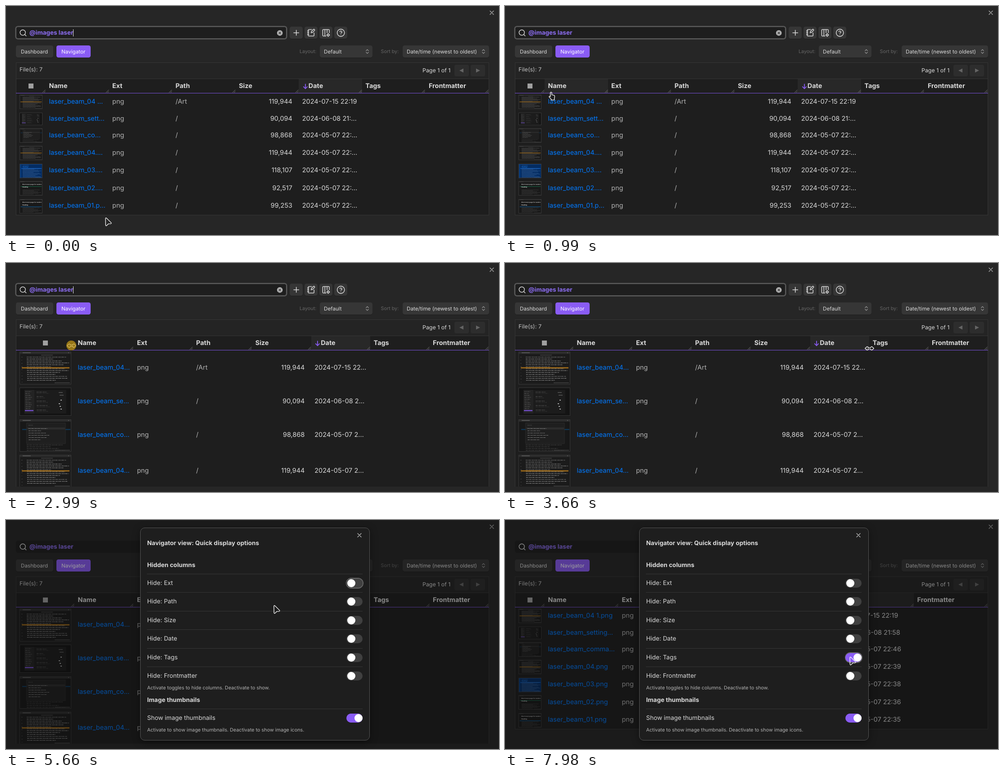
An HTML page that plays this animation: 1095x511 px, repeating every 8 s.

```html
<!DOCTYPE html>
<html lang="en">
<head>
<meta charset="utf-8">
<title>Navigator table</title>
<style>
html, body { margin: 0; width: 100%; height: 100%; overflow: hidden; background: #262626; }
#stage { position: absolute; left: 0; top: 0; width: 1095px; height: 511px; overflow: hidden;
  background: #262626; color: #dadada; font-family: Inter, "Open Sans", sans-serif; cursor: default;
  text-rendering: geometricPrecision; }
#stage div, #stage svg { position: absolute; box-sizing: border-box; }
.layer { inset: 0; }
#table { clip-path: inset(0 0 12px 0); }
.t { white-space: nowrap; line-height: 20px; }
.cell { overflow: hidden; text-overflow: ellipsis; }
.bold { font-weight: 650; }
.btn { background: #363636; border-radius: 4.5px; box-shadow: 0 1px 1px #0003; }
.line { background: #363636; height: 1px; }
svg { overflow: visible; fill: none; stroke-linecap: round; stroke-linejoin: round; }
</style>
</head>
<body>
<div id="stage">
  <div class="layer" id="base"></div>
  <div class="layer" id="table"></div>
  <div class="layer" id="dialog"></div>
  <div class="layer" id="pointer"></div>
</div>
<script>
const $ = id => document.getElementById(id);
const LOOP = 8000, LEFT = 22, RIGHT = 1072, TOP = 194.5, PAD = 7.48;
const PURPLE = '#8a5cf5';

const files = [
  ['laser_beam_04 1.png', '/Art', '119,944', '2024-07-15 22:19', .63, 'beam'],
  ['laser_beam_settings.png', '/', '90,094', '2024-06-08 21:58', .552, 'settings'],
  ['laser_beam_command.png', '/', '98,868', '2024-05-07 22:46', .625, 'palette'],
  ['laser_beam_04.png', '/', '119,944', '2024-05-07 22:39', .633, 'beam'],
  ['laser_beam_03.png', '/', '118,107', '2024-05-07 22:38', .633, 'blue'],
  ['laser_beam_02.png', '/', '92,517', '2024-05-07 22:36', .633, 'green'],
  ['laser_beam_01.png', '/', '99,253', '2024-05-07 22:35', .633, 'sky'],
];

// Each step holds until the next; values carry over unless changed.
const steps = [
  { at: 0, caret: 1, first: 66, cur: ['arrow', 220, 472] },
  { at: 330, row: 5, cur: ['hand', 188, 396] },
  { at: 660, caret: 0, row: 2, cur: ['hand', 146, 282] },
  { at: 990, row: -1, hot: 'Name', cur: ['hand', 97, 191] },
  { at: 1320, caret: 1, hot: '', cur: ['bone', 70, 179] },
  { at: 1670, cur: ['bone', 68, 179] },
  { at: 2010, caret: 0, first: 60, press: 1, cur: ['bone', 68, 178.5] },
  { at: 2340, first: 102, cur: ['bone', 119.5, 178.5] },
  { at: 2670, caret: 1, first: 122, cur: ['bone', 130, 178.5] },
  { at: 2990, first: 130, cur: ['bone', 134.5, 178.5] },
  { at: 3330, press: 0, row: 0, cur: ['arrow', 420, 206] },
  { at: 3660, caret: 0, row: -1, cur: ['bone', 798.5, 184.5] },
  { at: 3990, hot: 'Tags', cur: ['hand', 844, 185] },
  { at: 4330, caret: 1, hot: 'Frontmatter', cur: ['hand', 993, 184] },
  { at: 4660, cur: ['hand', 985, 181] },
  { at: 4990, caret: 0, hot: '', open: 1, focus: 'Ext', cur: ['arrow', 989, 181] },
  { at: 5320, cur: ['arrow', 949, 192] },
  { at: 5660, cur: ['arrow', 593.5, 189.5] },
  { at: 5990, cur: ['arrow', 431, 233] },
  { at: 6320, cur: ['arrow', 382, 300] },
  { at: 6650, cur: ['arrow', 370, 312] },
  { at: 6990, cur: ['arrow', 625, 309] },
  { at: 7320, cur: ['arrow', 776, 305] },
  { at: 7650, focus: 'Tags', tagsOff: 1, cur: ['arrow', 764.5, 304.5] },
  { at: 7980, first: 66, narrow: 1 },
];
steps.forEach((s, i) => { steps[i] = { row: -1, hot: '', ...steps[i - 1], ...s }; });

const box = (x, y, w, h, css = '', cls = '', inner = '') =>
  `<div class="${cls}" style="left:${x}px;top:${y}px;width:${w}px;height:${h}px;${css}">${inner}</div>`;
const text = (x, mid, size, str, css = '', cls = '') =>
  `<div class="t ${cls}" style="left:${x}px;top:${mid - 10}px;font-size:${size}px;${css}">${str}</div>`;
const svg = (x, y, w, h, view, inner, attrs = '') =>
  `<svg style="left:${x}px;top:${y}px" width="${w}" height="${h}" viewBox="0 0 ${view}" ${attrs}>${inner}</svg>`;
const icon = (cx, cy, size, inner, color = '#dadada', width = 1.9) =>
  svg(cx - size / 2, cy - size / 2, size, size, '24 24', inner, `stroke="${color}" stroke-width="${width}"`);
const path = d => `<path d="${d}"/>`;

const CROSS = path('M18 6L6 18M6 6l12 12');
const UPDOWN = path('M7 15l5 5 5-5M7 9l5-5 5 5');

function drawBase() {
  const tools = [
    path('M5 12h14M12 5v14'),
    path('M13.4 3H6a2 2 0 0 0-2 2v14a2 2 0 0 0 2 2h12a2 2 0 0 0 2-2v-6.6M2 7h4M2 12h4M2 17h4M18.4 2.6a2.2 2.2 0 0 1 3 3L16 11l-4 1 1-4z'),
    path('M12 21H5a2 2 0 0 1-2-2V5a2 2 0 0 1 2-2h14a2 2 0 0 1 2 2v7M9 3v18M15 3v9M18 14v1.5M18 20.5V22M14 18h1.5M20.5 18H22') +
      '<circle cx="18" cy="18" r="2.6"/>',
    '<circle cx="12" cy="12" r="10"/>' + path('M9.1 9a3 3 0 0 1 5.8 1c0 2-3 3-3 3M12 17h.01'),
  ];
  const button = (x, w, css) => box(x, 87.6, w, 27.6, css, 'btn');
  return icon(1079, 15, 16, CROSS, '#b3b3b3') +
    tools.map((d, i) => {
      const cx = 644.7 + i * 32.9;
      return box(cx - 14.5, 46, 29, 27, '', 'btn') + icon(cx, 59.5, 19.5, d);
    }).join('') +
    button(22, 83) + text(33, 101.5, 11.7, 'Dashboard') +
    button(111.6, 76.8, `background:${PURPLE}`) + text(123, 101.5, 11.7, 'Navigator', 'color:#fff') +
    text(652, 101.5, 10.8, 'Layout:', 'color:#666') +
    button(697, 117) + text(706, 101.5, 11.7, 'Default') + icon(802, 101.5, 13, UPDOWN, '#aaa') +
    text(832.5, 101.5, 10.8, 'Sort by:', 'color:#666') +
    button(881, 192) + text(890, 101.5, 11.7, 'Date/time (newest to oldest)') +
    icon(1060.5, 101.5, 13, UPDOWN, '#aaa');
}

function drawSearch(s) {
  const ring = s.open ? '' : 'border:.9px solid #5a5a5a;box-shadow:0 0 0 1.5px #5a5a5a';
  return box(22, 45.8, 601.4, 27.6, `background:#1e1e1e;border-radius:4.5px;${ring}`) +
    icon(38, 60, 18, '<circle cx="11" cy="11" r="8"/>' + path('M21 21l-4.3-4.3')) +
    text(52, 60, 13.5, '@images laser', 'color:#8b6cef', 'bold') +
    (s.caret ? box(149, 52, 1, 16, 'background:#e8e8e8') : '') +
    svg(601.8, 53.8, 12.4, 12.4, '12 12',
      '<circle cx="6" cy="6" r="6" fill="#b3b3b3"/><path d="M4 4l4 4M8 4l-4 4" stroke="#1e1e1e" stroke-width="1.3"/>');
}

// Rows of broken strokes standing in for miniature prose.
function prose(x, y, count, gap, width, color) {
  let out = '';
  for (let i = 0; i < count; i++) {
    const len = width * (.55 + .45 * Math.abs(Math.sin(i * 2.3 + 1)));
    out += `<path d="M${x} ${y + i * gap}h${len}" stroke-dasharray="3 1 2 1 4 1.2 1 1" stroke-dashoffset="${i * 7}"/>`;
  }
  return `<g stroke="${color}" stroke-width="1.2" stroke-linecap="butt">${out}</g>`;
}
const rect = (x, y, w, h, fill, extra = '') => `<rect x="${x}" y="${y}" width="${w}" height="${h}" fill="${fill}" ${extra}/>`;
const label = (x, y, size, str, fill) => `<text x="${x}" y="${y}" font-size="${size}" font-weight="700" fill="${fill}">${str}</text>`;

function picture(kind, h) {
  const tabs = rect(0, 0, 115, 5, '#2b2b2b') + rect(7, 1.8, 18, 1.2, '#666') + rect(108, 1.8, 2, 1.2, '#666');
  const foot = rect(78, h - 3.6, 34, 1.2, '#4c4c4c');
  switch (kind) {
    case 'beam':
      return rect(0, 0, 115, h, '#1b1b1b') + tabs + rect(48, 7, 26, 1, '#555') +
        prose(16, 12, 13, 4.3, 94, '#858585') + prose(4, 12, 9, 7, 3, '#444') +
        rect(5, 34.2, 106, 3.4, '#8a5a14', 'opacity=".65"') + rect(5, 35.4, 106, 1.1, '#c98a20') + foot;
    case 'settings':
      return rect(0, 0, 115, h, '#141414') + rect(11, 5, 93, 53, '#1c1c1c') + rect(11, 5, 22, 53, '#232323') +
        prose(13, 9, 10, 4.2, 15, '#555') + rect(12, 50, 19, 2.6, '#6f4cc4') +
        prose(38, 10, 5, 10, 24, '#5c5c5c') + prose(38, 13, 5, 10, 30, '#363636') +
        [10, 16, 27, 35, 41, 47].map((y, i) => rect(87 + i % 3 * 2, y, i > 1 ? 3 : 9, 2, i > 1 ? '#aaa' : '#4a4a4a')).join('');
    case 'palette':
      return rect(0, 0, 115, h, '#181818') + tabs + prose(16, 57, 4, 4, 86, '#4c4c4c') +
        rect(6, 21.5, 107, 2, '#0e3d62') + rect(16, 8, 86, 46, '#1f1f1f', 'stroke="#333" stroke-width=".7"') +
        rect(17, 18, 84, 4.5, '#2c2c2c') + prose(20, 13, 1, 5, 10, '#555') + prose(20, 20.5, 6, 5, 46, '#808080') + foot;
    case 'blue':
      return rect(0, 0, 115, h, '#042c62') + rect(0, 0, 115, 4, '#0b448e') + rect(0, 0, 10, h, '#073978') +
        rect(16, 8, 30, 1.2, '#3f70a8') + label(15, 18, 6.5, 'Heading 1', '#238aff') +
        rect(9, 22, 102, 4, '#0a56b4') + prose(16, 24, 12, 4, 94, '#5f88bb') + rect(78, h - 3.6, 34, 1.2, '#4473ab');
    default: {
      const glow = kind === 'green' ? '#14583c' : '#115488';
      const at = kind === 'green' ? 25 : 37;
      return rect(0, 0, 115, h, '#191919') + tabs + label(14, 18.5, 7, 'Short news page for readers', '#c4c4c4') +
        rect(6, at, 105, 2.8, glow) + label(14, 32, 7, 'Heading', '#ddd') +
        prose(16, 44, 6, 4.3, 92, '#606060') + foot;
    }
  }
}

function thumb(y, w, ratio, kind) {
  const h = 115 * ratio;
  return svg(30, y, w, w * ratio, `115 ${h}`, picture(kind, h)) +
    box(30, y, w, w * ratio, 'border:1px solid #383838');
}

function drawTable(s) {
  const names = ['Name', 'Ext', 'Path', 'Size', 'Date', 'Tags', 'Frontmatter'].filter(n => !(s.narrow && n === 'Tags'));
  const start = LEFT + s.first, colW = (RIGHT - start) / names.length, inner = colW - 2 * PAD;
  const colX = i => start + i * colW;
  const tops = [TOP];
  files.forEach((f, i) => tops.push(tops[i] + (s.first - 15) * f[4] + 7.2));
  const bottom = tops[files.length];
  const grip = x => svg(x - 7, 187, 6.5, 6.5, '6 6', path('M.4 5.6L5.6 .4M3.6 5.6L5.6 3.6'), 'stroke="#999" stroke-width=".7"');

  let out = box(LEFT, 126, 1051, bottom - 126 + 1, 'background:#1e1e1e;border:1px solid #363636') +
    box(23, 127, 1049, 35, 'background:#242424') + box(LEFT, 162, 1051, 1, '', 'line') +
    text(30, 142.5, 12.6, 'File(s): 7', 'color:#c4c4c4') +
    text(925, 144, 12.4, 'Page 1 of 1') +
    [996, 1032].map((x, i) => box(x, 131, 32, 26, 'background:#2d2d2d;border-radius:4px') +
      svg(x + 11, 139, 10, 10, '10 10', `<path d="${i ? 'M1 .5L10 5 1 9.5z' : 'M9 .5L0 5l9 4.5z'}" fill="#646464"/>`)).join('') +
    box(LEFT + s.first / 2 - 5.5, 173, 11, 11, 'background:#a0a0a0') + grip(start);

  names.forEach((n, i) => {
    const x = colX(i), sorted = n === 'Date';
    if (sorted || n === s.hot) out += box(x, 163, colW, 31, 'background:#282828');
    if (sorted) out += svg(x + 9.5, 173.5, 10, 11, '10 11', path('M5 .5v10M.8 6.2L5 10.4l4.2-4.2'), `stroke="${PURPLE}" stroke-width="1.8"`);
    out += text(x + PAD + (sorted ? 14 : 0), 179, 14.4, n, '', 'bold') + grip(x + colW);
  });

  files.forEach(([name, dir, size, date, ratio, kind], i) => {
    const y = tops[i], mid = (y + tops[i + 1]) / 2;
    const cell = (col, str, css) => text(colX(col) + PAD, mid, 14.5, str, `width:${inner}px;${css}`, 'cell');
    if (s.row === i) out += box(23, y, 1049, tops[i + 1] - y, 'background:#2c2c2c');
    out += thumb(y + 3.8, s.first - 15, ratio, kind) +
      cell(0, name, 'color:#027aff') + cell(1, 'png', 'color:#b3b3b3') + cell(2, dir, 'color:#b3b3b3') +
      cell(3, size, `text-align:right;width:${colW - PAD - 14.3}px`) + cell(4, date, '');
  });
  return out + box(LEFT, 193.7, 1051, 1.3, 'background:#7a52dc');
}

function toggle(mid, on, focus) {
  return (focus ? box(754.5, mid - 12, 39.5, 23.5, 'border:2px solid #666;border-radius:12px') : '') +
    box(756, mid - 10, 36, 20, `background:${on ? PURPLE : '#404040'};border-radius:10px`) +
    box(on ? 773.5 : 757.5, mid - 9, 18, 18, 'background:#fff;border-radius:50%');
}

function drawDialog(s) {
  if (!s.open) return '';
  const rule = y => box(313, y, 479, 1, '', 'line');
  const hint = (y, str) => text(313.5, y, 10.8, str, 'color:#b3b3b3');
  const options = ['Ext', 'Path', 'Size', 'Date', 'Tags', 'Frontmatter'];
  return box(0, 0, 1095, 511, 'background:rgba(10,10,10,.4)') +
    box(298, 17, 510, 475, 'background:#1e1e1e;border:1px solid #555;border-radius:10px;box-shadow:0 4px 18px #0006') +
    icon(785, 34, 16, CROSS, '#c0c0c0') +
    text(313.5, 51.5, 13.5, 'Navigator view: Quick display options', '', 'bold') +
    text(313.5, 101, 13.5, 'Hidden columns', '', 'bold') +
    options.map((n, i) => {
      const mid = 141 + i * 41.45;
      return rule(Math.round(120 + i * 41.4)) + text(313.5, mid, 13.5, 'Hide: ' + n) +
        toggle(Math.round(mid), n === 'Tags' && s.tagsOff, n === s.focus);
    }).join('') +
    hint(375, 'Activate toggles to hide columns. Deactivate to show.') +
    text(313.5, 401.5, 13.5, 'Image thumbnails', '', 'bold') + rule(421) +
    text(313.5, 441.5, 13.5, 'Show image thumbnails') + toggle(442, true, false) +
    hint(469, 'Activate to show image thumbnails. Deactivate to show image icons.');
}

const cursors = {
  arrow: 'M1 2.2L1.3 16.8Q1.6 19.6 3.8 17.8L7.4 14.2 12.6 13.8Q15 13.2 13.4 11.4L3.2 1.2Q1.1 -.2 1 2.2z',
  hand: 'M3.6 2.4Q5.4 -.2 7 2.4V7.2L11.8 8.2Q13.6 8.8 13.4 11L12.6 15.6V18.6H5.4V16.6L1.2 12.4Q.4 10.4 2.4 10.4L3.8 11.2z',
  bone: 'M1.2 4.9L4.6 1.9Q7 .7 7.6 3.9H13.4Q14 .7 16.4 1.9L19.8 4.9Q20.4 5.5 19.8 6.1L16.4 9.1Q14 10.3 13.4 7.1H7.6Q7 10.3 4.6 9.1L1.2 6.1Q.6 5.5 1.2 4.9z',
};

function drawPointer({ cur: [kind, x, y], press }) {
  const shape = svg(x, y, 21, 20, '21 20', path(cursors[kind]),
    press ? 'fill="#8a6c10" stroke="#e0c468" stroke-width="1.1"' : 'fill="#0c0c0c" stroke="#fff" stroke-width="1.3"');
  const halo = press ? box(x - .5, y - 5.5, 22, 22, 'background:#967618;border-radius:50%') : '';
  return halo + shape;
}

const base = drawBase();
let shown = -1;
function show(i) {
  const s = steps[i];
  $('base').innerHTML = base + drawSearch(s);
  $('table').innerHTML = drawTable(s);
  $('dialog').innerHTML = drawDialog(s);
  $('pointer').innerHTML = drawPointer(s);
  shown = i;
}

const begin = performance.now();
function tick() {
  const t = (performance.now() - begin) % LOOP;
  const i = steps.findLastIndex(s => s.at <= t);
  if (i !== shown) show(i);
  requestAnimationFrame(tick);
}
tick();
</script>
</body>
</html>
```
